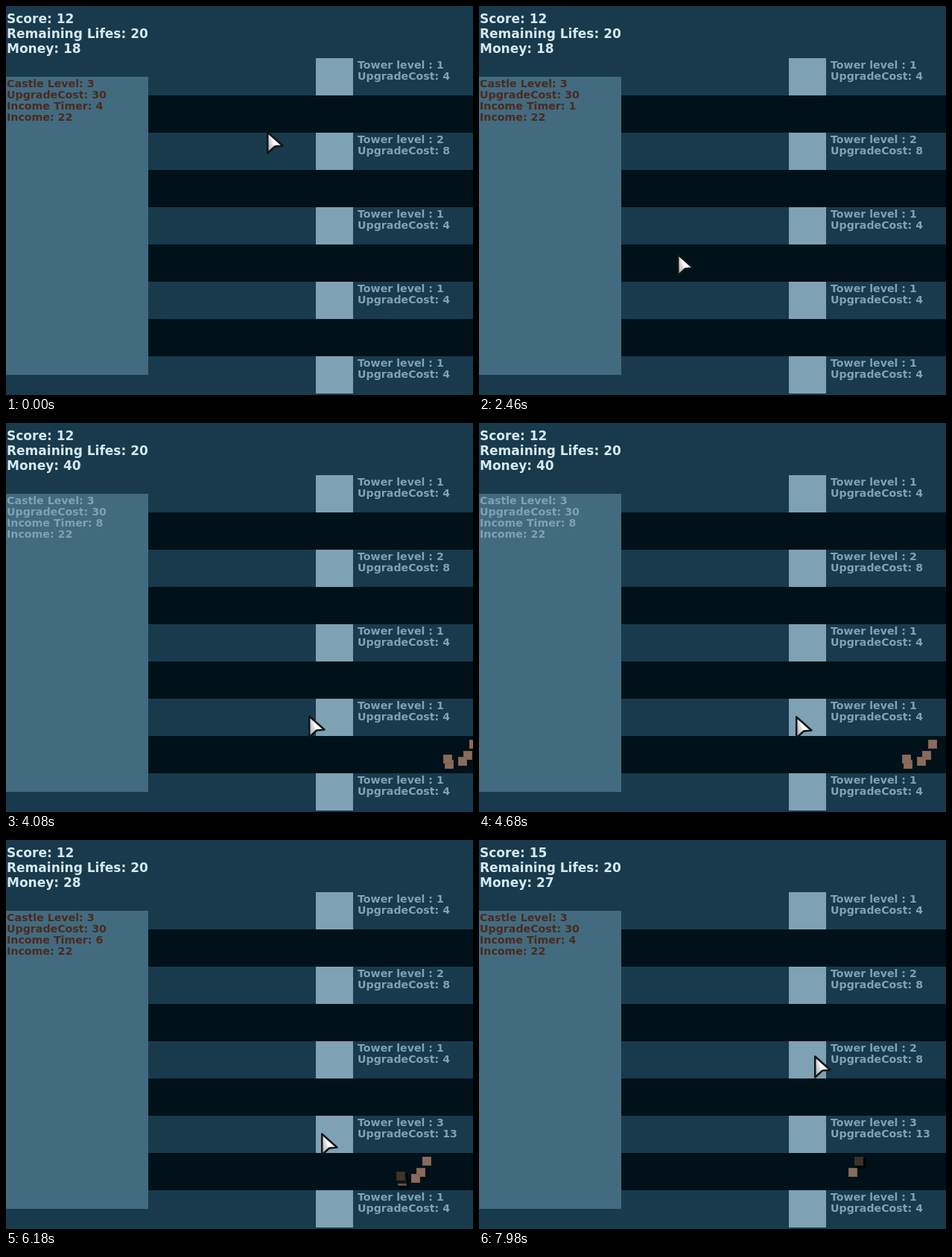
Recreate the animation shown at these times as an HTML page with a canvas. Size 627x522 px, loop 8 s.

```html
<!DOCTYPE html>
<html lang="en">
<head>
<meta charset="utf-8">
<title>Tower lanes</title>
<style>
  html, body { margin: 0; width: 100%; height: 100%; overflow: hidden; background: #183a4c; }
  canvas { display: block; }
</style>
</head>
<body>
<canvas id="stage" width="627" height="522"></canvas>
<script>
const ctx = document.getElementById('stage').getContext('2d');
const LOOP = 8000, STEP = 60;
const FAMILY = '"DejaVu Sans", sans-serif';
const COLOR = {
  ground: '#183a4c', lane: '#001119', castle: '#426b80', tower: '#7fa1b4',
  hud: '#d6e8f1', poor: '#4c2a1d', enemy: [138, 107, 91], burnt: [8, 12, 11]
};
const COSTS = [0, 4, 8, 13];
const CASTLE_COST = 30, INCOME = 22;
const TICK = 977, FIRST_TICK = 100, PAYDAY = FIRST_TICK + 4 * TICK;
const FADE = 600, SIZE = 12;

// time, x, y of the pointer tip
const POINTER = [
  [0, 350, 168], [300, 350, 168], [1080, 260, 271], [1560, 260, 271],
  [1860, 260, 299], [1980, 260, 299], [2460, 266, 332], [2760, 277, 362],
  [2820, 277, 362], [3420, 337, 386], [3900, 400, 392], [4680, 425, 393],
  [6180, 423, 393], [6500, 423, 393], [7200, 434, 292], [7980, 450, 289]
];
// time, distance walked by the group
const MARCH = [[2160, -80], [3420, -40], [4680, 0], [6180, 44], [7200, 76], [7980, 99]];
const ENEMIES = [
  { x: 603, y: 425, dies: 8220 },
  { x: 595, y: 440, dies: Infinity },
  { x: 588, y: 448, dies: 7260 },
  { x: 570, y: 452, dies: 6600 },
  { x: 568, y: 445, dies: 6430 }
];
const UPGRADES = [
  { at: 5040, tower: 3, cost: 4 },
  { at: 5640, tower: 3, cost: 8 },
  { at: 7620, tower: 2, cost: 4 }
];

function track(keys, t) {
  let i = 1;
  while (i < keys.length - 1 && keys[i][0] < t) i++;
  const a = keys[i - 1], b = keys[i];
  const k = Math.min(1, Math.max(0, (t - a[0]) / (b[0] - a[0])));
  return a.slice(1).map((v, j) => Math.round(v + (b[j + 1] - v) * k));
}

function stateAt(t) {
  const levels = [1, 2, 1, 1, 1];
  const kills = ENEMIES.filter(e => t >= e.dies).length;
  let money = 18 + kills + (t >= PAYDAY ? INCOME : 0);
  for (const u of UPGRADES) {
    if (t >= u.at) {
      levels[u.tower]++;
      money -= u.cost;
    }
  }
  const ticks = Math.floor((t - FIRST_TICK) / TICK) + 1;
  return { levels, money, score: 12 + kills, timer: ticks < 5 ? 4 - ticks : 13 - ticks };
}

function rect(x, y, w, h, color) {
  ctx.fillStyle = color;
  ctx.fillRect(x, y, w, h);
}

function lines(list, x, y, size, pitch, color) {
  ctx.font = `bold ${size}px ${FAMILY}`;
  ctx.fillStyle = color;
  list.forEach((s, i) => ctx.fillText(s, x, y + i * pitch));
}

function drawEnemy(e, t, walked) {
  if (t >= e.dies) return;
  const x = e.x - walked;
  const k = Math.max(0, 1 - (e.dies - t) / FADE);
  const shade = f => `rgb(${COLOR.enemy.map((c, i) => Math.round((c + (COLOR.burnt[i] - c) * k) * f))})`;
  if (k > 0) rect(x + 2, e.y + 2, 14, 14, `rgba(0,0,0,${Math.min(1, k * 1.3)})`);
  rect(x, e.y, SIZE, SIZE, shade(0.9));
  rect(x + 1, e.y + 1, SIZE - 2, SIZE - 2, shade(1));
}

function drawPointer(x, y) {
  ctx.save();
  ctx.translate(x, y);
  const fill = ctx.createLinearGradient(1, 18, 13, 14);
  fill.addColorStop(0, '#b4b6b8');
  fill.addColorStop(0.55, '#e2e3e4');
  fill.addColorStop(0.65, '#ffffff');
  ctx.beginPath();
  ctx.moveTo(1.2, 1.5);
  ctx.lineTo(21.5, 19.5);
  ctx.lineTo(11, 20.5);
  ctx.lineTo(1.2, 29.5);
  ctx.closePath();
  ctx.lineJoin = 'round';
  ctx.lineWidth = 2.5;
  ctx.fillStyle = fill;
  ctx.strokeStyle = '#111618';
  ctx.fill();
  ctx.stroke();
  ctx.restore();
}

function draw(t) {
  const s = stateAt(t);
  rect(0, 0, 627, 522, COLOR.ground);
  for (let i = 0; i < 4; i++) rect(191, 120 + i * 100, 436, 50, COLOR.lane);
  rect(0, 95, 191, 400, COLOR.castle);

  s.levels.forEach((level, i) => {
    const y = 70 + i * 100, cost = COSTS[level];
    rect(416, y, 50, 50, COLOR.tower);
    lines([`Tower level : ${level}`, `UpgradeCost: ${cost}`], 472, y + 14, 14.2, 15,
      s.money >= cost ? COLOR.tower : COLOR.poor);
  });

  const [walked] = track(MARCH, t);
  ENEMIES.forEach(e => drawEnemy(e, t, walked));

  lines([`Score: ${s.score}`, 'Remaining Lifes: 20', `Money: ${s.money}`],
    1, 23, 17, 20, COLOR.hud);
  lines(['Castle Level: 3', `UpgradeCost: ${CASTLE_COST}`, `Income Timer: ${s.timer}`,
    `Income: ${INCOME}`], 1, 109, 14.2, 15,
    s.money >= CASTLE_COST ? COLOR.tower : COLOR.poor);

  drawPointer(...track(POINTER, t));
}

const start = performance.now();
function frame() {
  const t = (performance.now() - start) % LOOP;
  draw(Math.floor(t / STEP) * STEP);
  requestAnimationFrame(frame);
}
frame();
</script>
</body>
</html>
```
